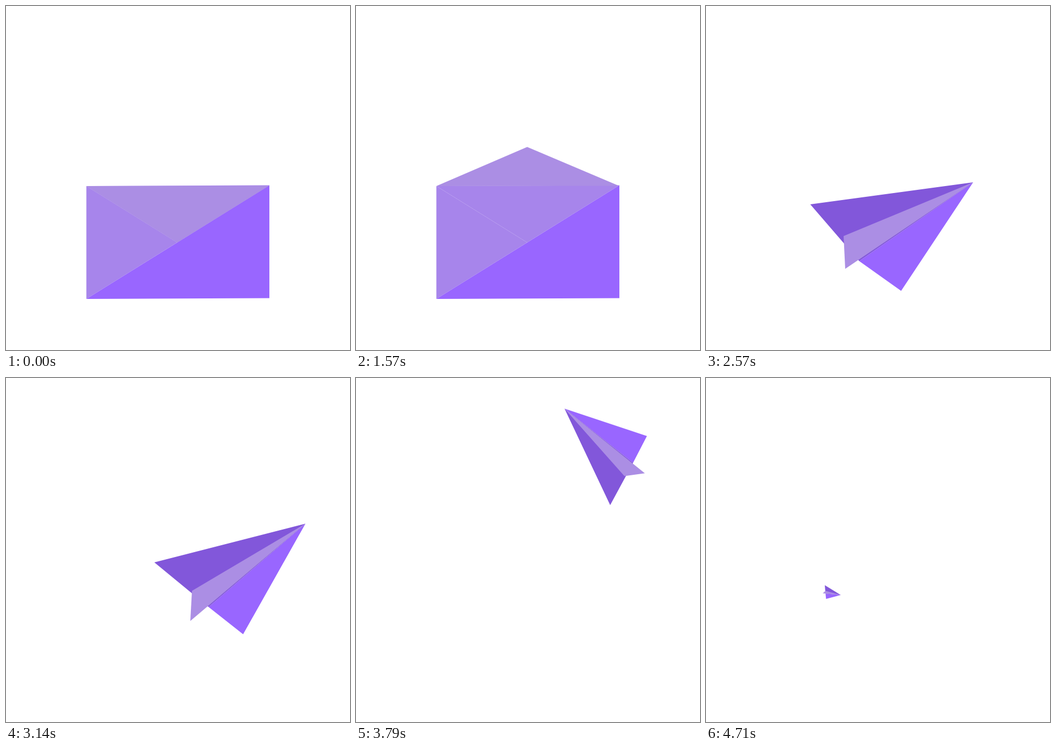
Animation of 640x640 px, one loop 4.78 s. Source, as an HTML page with a canvas:

```html
<!DOCTYPE html>
<html lang="en">
<head>
<meta charset="utf-8">
<title>Envelope to paper plane</title>
<style>
  html, body { margin: 0; width: 100%; height: 100%; overflow: hidden; background: #fff; }
  canvas { display: block; }
</style>
</head>
<body>
<canvas id="stage" width="640" height="640"></canvas>
<script>
const ctx = document.getElementById('stage').getContext('2d');
const LOOP = 4780, FPS = 14;
const SIDE = [167, 133, 235], DARK = [130, 87, 218];
const FLAP = '#ab8ee4', BRIGHT = '#9966ff';

// Times below are counted in ticks of 1/14 s.
const OPEN = 1, FLAT = 5.2, RISEN = 16.7, CLOSE = 20, FOLD = 27, LAUNCH = 36, FLY = 44;

const TL = [149.5, 335], TR = [490, 333.5], BR = [490, 543.5], BL = [149.5, 545];
const CENTER = [318.5, 440];

// Plane corners as it leaves the fold
const folded = {
  tip: [497, 328], left: [194, 369], right: [363, 530],
  crease: [256, 428], fin: [259, 489], keel: [285, 474.5]
};
// Plane corners around its middle, nose along +x
const plane = {
  tip: [121, 0], left: [-150.5, -102.4], right: [-92, 102],
  crease: [-123.6, -18.8], fin: [-158.2, 25.3], keel: [-115.5, 23.5]
};
// tick, x, y, heading in degrees, scale
const flight = [
  [36, 388, 389, -30, 1.03], [44, 458, 340.5, -35, 1], [48, 516, 272, -58, .92],
  [50, 524, 218, -84, .83], [52, 488, 143.5, -120, .73], [53, 447.5, 114.5, -136, .684],
  [57, 255, 100, -195, .515], [60, 112, 162, -243, .378], [62, 66, 262, -276, .29],
  [64, 115, 362, -313, .205], [66, 236.5, 401, -349.4, .12]
];

const clamp = v => Math.max(0, Math.min(1, v));
const span = (k, a, b) => clamp((k - a) / (b - a));
const mix = (a, b, p) => a + (b - a) * p;
const mixAll = (a, b, p) => a.map((v, i) => mix(v, b[i], p));
const smooth = p => p * p * (3 - 2 * p);
const rgb = c => `rgb(${c.map(Math.round)})`;

function poly(color, ...points) {
  ctx.fillStyle = color;
  ctx.beginPath();
  points.forEach(p => ctx.lineTo(...p));
  ctx.fill();
}

// Smooth curve through the flight keys
function flightAt(k) {
  let i = 1;
  while (i < flight.length - 2 && k >= flight[i + 1][0]) i++;
  const a = flight[i], b = flight[i + 1], width = b[0] - a[0], u = (k - a[0]) / width;
  const slope = (n, c) => {
    const p = flight[n - 1], q = flight[Math.min(n + 1, flight.length - 1)];
    return (q[c] - p[c]) / (q[0] - p[0]) * width;
  };
  return [1, 2, 3, 4].map(c =>
    mix(a[c], b[c], smooth(u)) +
    u * (1 - u) * ((1 - u) * slope(i, c) - u * slope(i + 1, c)));
}

function placedPlane(k) {
  const [x, y, heading, scale] = flightAt(k);
  const cos = Math.cos(heading * Math.PI / 180) * scale;
  const sin = Math.sin(heading * Math.PI / 180) * scale;
  const place = ([px, py]) => [x + px * cos - py * sin, y + px * sin + py * cos];
  return Object.fromEntries(Object.entries(plane).map(([name, p]) => [name, place(p)]));
}

function drawPlane(p) {
  poly(BRIGHT, p.tip, p.right, p.keel);
  poly(rgb(DARK), p.tip, p.left, p.keel);
  poly(FLAP, p.tip, p.crease, p.fin);
}

function flapApex(k) {
  if (k < FLAT) return mix(440, 335, span(k, OPEN, 4) ** 2);
  const rise = 1 - (1 - span(k, FLAT, RISEN)) ** 3;
  return mix(mix(335, 230.5, rise), 335, span(k, CLOSE, 26.6));
}

function drawEnvelope(k) {
  // The inside of the back shrinks upward
  const bottom = Math.min(440, mix(545, 335, span(k, CLOSE, FOLD)));
  const cut = (bottom - 335) / 105;
  poly(rgb(SIDE), TL, TR, mixAll(TR, CENTER, cut), mixAll(TL, CENTER, cut));
  poly(rgb(SIDE), TL, CENTER, BL);
  poly(BRIGHT, TR, BR, BL);
  poly(FLAP, TL, [489, 334.5], [318.5, flapApex(k)]);
}

function drawFolding(p) {
  const f = folded, tip = mixAll(TR, f.tip, p), keel = mixAll(BL, f.keel, p);
  poly(BRIGHT, tip, mixAll(BR, f.right, p), keel);
  poly(rgb(mixAll(SIDE, DARK, p)), mixAll(TL, f.left, p), mixAll(CENTER, f.tip, p), keel);
  poly(FLAP, tip, mixAll(TL, f.crease, p), mixAll([318.5, 335], f.fin, p));
}

function draw(k) {
  ctx.fillStyle = '#fff';
  ctx.fillRect(0, 0, 640, 640);
  if (k <= FOLD) drawEnvelope(k);
  else if (k < LAUNCH) drawFolding(smooth(span(k, FOLD, LAUNCH)));
  else if (k < FLY) {
    const start = placedPlane(FLY), p = span(k, LAUNCH, FLY) ** 1.2;
    drawPlane(Object.fromEntries(Object.keys(plane).map(
      name => [name, mixAll(folded[name], start[name], p)])));
  } else drawPlane(placedPlane(k));
}

const began = performance.now();
function tick() {
  const t = (performance.now() - began) % LOOP;
  draw(Math.floor((t + 5) * FPS / 1000));
  requestAnimationFrame(tick);
}
tick();
</script>
</body>
</html>
```
